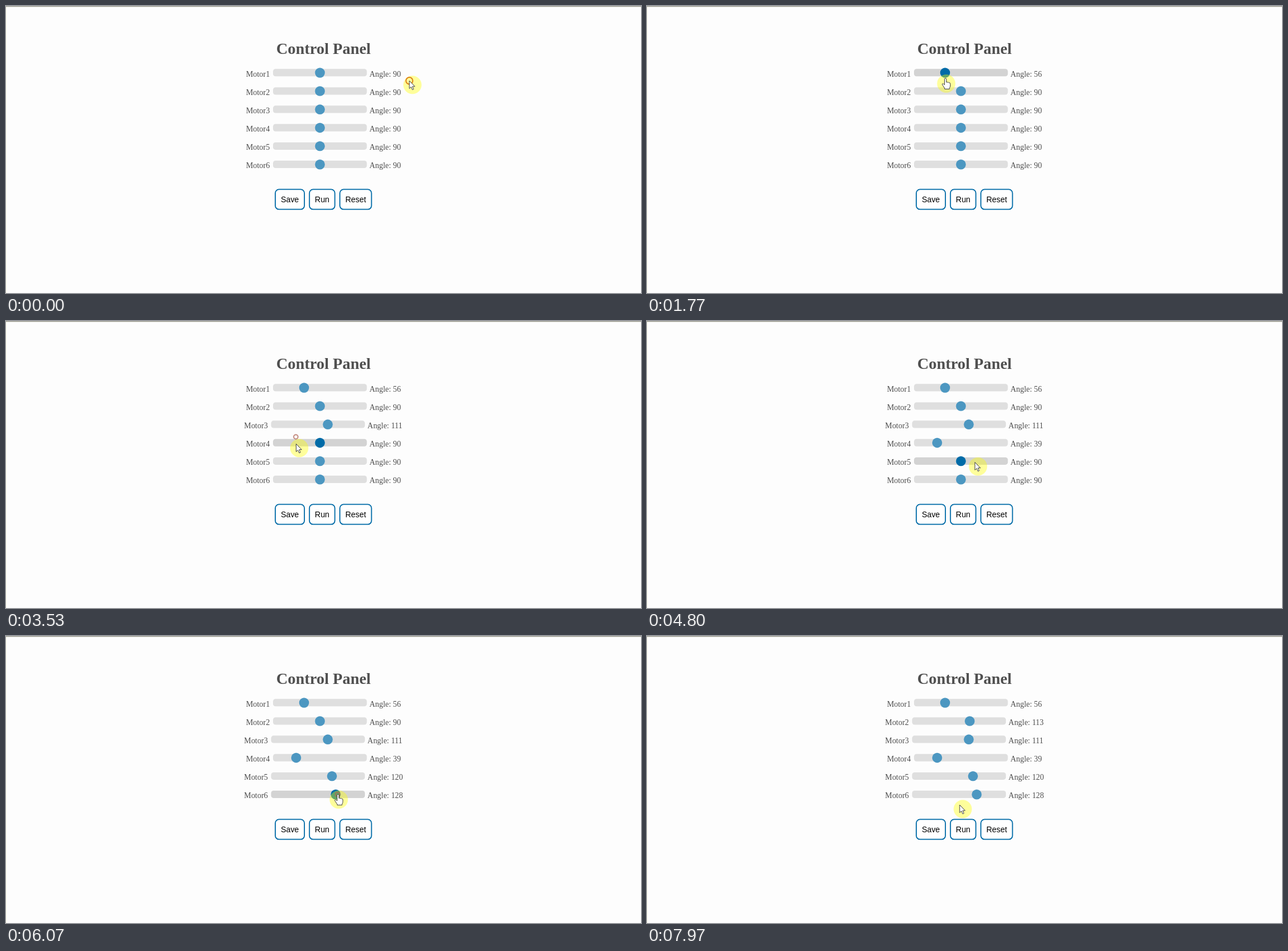
Animation of 1113x503 px, one loop 8 s. Source, as an HTML page:

```html
<!DOCTYPE html>
<html lang="en">
<head>
<meta charset="utf-8">
<title>Control Panel</title>
<style>
  html, body { margin: 0; width: 100%; height: 100%; overflow: hidden; background: #fdfdfd; }
  svg { display: block; width: 1113px; height: 503px; }
  text { fill: #4f4f4f; }
  .label { font: 13.9px "Liberation Serif", "Times New Roman", serif; }
  .title { font: bold 27.8px "Liberation Serif", "Times New Roman", serif; text-anchor: middle; }
  .button text { font: 13.9px "Liberation Sans", Arial, sans-serif; fill: #000; text-anchor: middle; }
  .button rect { fill: #fff; stroke: #006ba7; stroke-width: 1.8; }
  .cursor { fill: #fff; stroke: #3c3c3c; stroke-linejoin: round; }
</style>
</head>
<body>
<svg id="stage" viewBox="0 0 1113 503"></svg>
<script>
const LOOP = 8000;
const FADE = 200;
const RING_LIFE = 320;
const TRACK = { x: 468, width: 164.5 };
const THUMB = 8.7;
const PER_DEGREE = (TRACK.width - 2 * THUMB) / 180;

const lerp = (a, b, k) => a + (b - a) * k;
const rowY = i => 117 + i * 32.15;
const thumbX = angle => TRACK.x + THUMB + angle * PER_DEGREE;

// Where the pointer rests; on a motor it clicks the track at the given angle
const rests = [
  { from: 0, to: 670, x: 707, y: 131, click: -50 },
  { from: 1440, to: 1850, motor: 0, angle: 56, drop: 10 },
  { from: 2480, to: 2780, motor: 2, angle: 111 },
  { from: 3070, to: 3250, x: 508, y: 203, click: 3250 },
  { from: 3340, to: 4080, motor: 3, angle: 39, drop: 2, click: 3650 },
  { from: 4500, to: 5250, motor: 4, angle: 120, drop: 2, click: 4930 },
  { from: 5600, to: 6110, motor: 5, angle: 128, click: 5800 },
  { from: 6470, to: 6960, x: 566, y: 131 },
  { from: 7130, to: 7400, motor: 1, angle: 113 },
  { from: 7820, to: LOOP, x: 548, y: 296 }
];
const motors = [];
for (const r of rests) {
  if (r.angle) {
    r.click ??= r.from;
    r.x = thumbX(r.angle);
    r.y = rowY(r.motor) + (r.drop ?? 0);
    motors[r.motor] = r;
  }
}

const stage = document.getElementById("stage");

function set(el, attrs) {
  for (const key in attrs) el.setAttribute(key, attrs[key]);
}

function add(parent, tag, attrs, text) {
  const el = document.createElementNS("http://www.w3.org/2000/svg", tag);
  set(el, attrs);
  if (text) el.textContent = text;
  parent.append(el);
  return el;
}

add(stage, "rect", { width: 1113, height: 503, fill: "#fdfdfd" });
add(stage, "rect", { width: 1, height: 503, fill: "#fefeec" });
add(stage, "rect", { width: 1113, height: 1.4, fill: "#96968a" });
add(stage, "text", { class: "title", x: 556.5, y: 84 }, "Control Panel");

const rows = motors.map((_, i) => {
  const y = rowY(i);
  const row = add(stage, "g", {});
  add(row, "text", { class: "label", x: 420.7, y: y + 6.5 }, "Motor" + (i + 1));
  const track = add(row, "rect", { ...TRACK, y: y - 6.7, height: 13, rx: 4.4, fill: "#d3d3d3" });
  // The cover hides the track below the translucent thumb
  const cover = add(row, "circle", { cy: y, r: THUMB, fill: "#fdfdfd" });
  const thumb = add(row, "circle", { cy: y, r: THUMB, fill: "#006ba7" });
  const label = add(row, "text", { class: "label", x: 637, y: y + 6.5 });
  return { row, track, cover, thumb, label };
});

let left = 472;
for (const [name, width] of [["Save", 51], ["Run", 44.6], ["Reset", 55.4]]) {
  const button = add(stage, "g", { class: "button" });
  add(button, "rect", { x: left, y: 321.4, width, height: 35, rx: 6.5 });
  add(button, "text", { x: left + width / 2, y: 344 }, name);
  left += width + 8.8;
}

const halo = add(stage, "circle", { r: 16, fill: "#ff0", "fill-opacity": 0.39 });
const rings = rests.filter(r => r.click).map(r => {
  const cy = r.y - (r.drop ?? 0);
  const el = add(stage, "circle", { cx: r.x, cy, fill: "none", "stroke-width": 2 });
  return { el, click: r.click };
});
const arrow = add(stage, "path", {
  class: "cursor",
  d: "M0 0V13.6L3.1 10.8 5.3 15.8 7.5 14.8 5.3 10H9.6Z"
});
const hand = add(stage, "path", {
  class: "cursor",
  d: "M-1 1.3Q-1-.3.6-.3T2.2 1.3V6.6Q3.7 5.7 4.8 6.9 6.3 6.3 7.1 7.5 9.1 7.2 9.1 9.3V13" +
     "Q9.1 15 7.7 16.6V18.5H-.8V17L-4.4 11.6Q-5.8 9.4-4.2 9-2.9 8.8-1 11.2Z"
});

function pointer(t) {
  const n = Math.max(0, rests.findLastIndex(r => r.from <= t));
  const a = rests[n], b = rests[n + 1];
  if (!b || t <= a.to) return a;
  const k = (t - a.to) / (b.from - a.to);
  const e = k * k * (3 - 2 * k);
  return { x: lerp(a.x, b.x, e), y: lerp(a.y, b.y, e) };
}

// A third digit widens the centred row and moves it left
function motorAt(i, t) {
  const angle = t < motors[i].click + 30 ? 90 : motors[i].angle;
  return { angle, x: thumbX(angle), shift: angle < 100 ? 0 : 3.4 };
}

function overThumb(i, t) {
  const p = pointer(t), m = motorAt(i, t);
  return Math.hypot(p.x - m.x + m.shift, p.y - rowY(i)) < 10.5;
}

function hovered(i, t) {
  const p = pointer(t);
  const dx = p.x - TRACK.x + motorAt(i, t).shift;
  const onTrack = dx > 0 && dx < TRACK.width && Math.abs(p.y - rowY(i)) < 7.5;
  return onTrack || overThumb(i, t);
}

// Share of the last FADE ms spent over the slider
function glow(i, t) {
  const samples = 20;
  let hits = 0;
  for (let s = 0; s < samples; s++) hits += hovered(i, t - s * FADE / samples);
  return hits / samples;
}

function draw(t) {
  rows.forEach((r, i) => {
    const m = motorAt(i, t);
    const opacity = lerp(0.7, 1, glow(i, t));
    set(r.row, { transform: `translate(${-m.shift} 0)` });
    set(r.track, { opacity });
    set(r.cover, { cx: m.x });
    set(r.thumb, { cx: m.x, opacity });
    r.label.textContent = "Angle: " + m.angle;
  });

  const { x, y } = pointer(t);
  const transform = `translate(${x} ${y})`;
  const grab = motors.some((_, i) => overThumb(i, t));
  set(halo, { cx: x + (grab ? 2 : 5.4), cy: y + (grab ? 9 : 7.3) });
  set(arrow, { transform, visibility: grab ? "hidden" : "visible" });
  set(hand, { transform, visibility: grab ? "visible" : "hidden" });

  for (const { el, click } of rings) {
    const k = (t - click) / RING_LIFE;
    const on = k >= 0 && k < 1;
    set(el, { visibility: on ? "visible" : "hidden" });
    if (!on) continue;
    const rgb = [lerp(230, 170, k), lerp(130, 95, k), lerp(0, 95, k)].map(Math.round);
    set(el, { r: lerp(6.4, 3.4, k), stroke: `rgb(${rgb})`, opacity: lerp(1, 0.7, k) });
  }
}

const start = performance.now();
function tick() {
  draw((performance.now() - start) % LOOP);
  requestAnimationFrame(tick);
}
draw(0);
requestAnimationFrame(tick);
</script>
</body>
</html>
```
